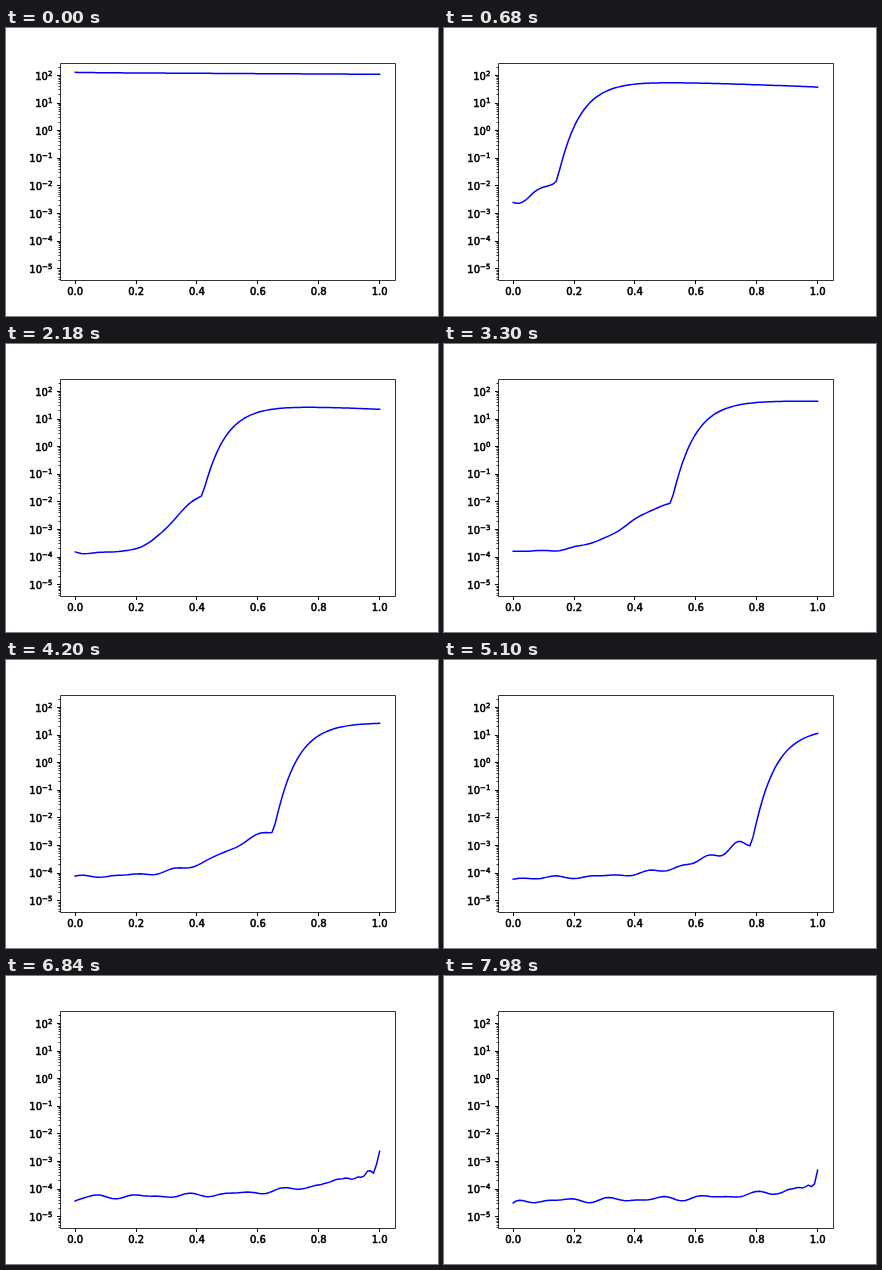
These frames come from a looping animation (432 px wide and 288 px high, 8000 ms). An HTML page:

```html
<!DOCTYPE html>
<html lang="en">
<head>
<meta charset="utf-8">
<title>Log curve</title>
<style>
  html, body { margin: 0; width: 100%; height: 100%; overflow: hidden; background: #fff; }
  svg { display: block; width: 432px; height: 288px; }
  text { font: 10px "DejaVu Sans", sans-serif; stroke: #000; stroke-width: .55px; }
  .sup { font-size: 7px; }
</style>
</head>
<body>
<svg viewBox="0 0 432 288">
  <g id="axes" fill="none" stroke="#000"></g>
  <g id="labels"></g>
  <path id="curve" fill="none" stroke="#00f" stroke-width="1.5" stroke-linejoin="round" stroke-linecap="square"/>
</svg>
<script>
const LOOP = 8000, STEP = 20, COUNT = 100;
const LEFT = 69.2, WIDTH = 304.4, Y100 = 47.4, DECADE = 27.62;

// A front sweeps right: behind it lies a low trail, ahead a rise to a plateau.
// base, kink and top are powers of ten; mid is where the trail is half way up.
const poses = [
  { t: 0,    front: 0,    base: 2.11,  kink: 2.11,  top: 2.1,  mid: .4 },
  { t: 300,  front: .05,  base: -1.7,  kink: -1.35, top: 1.88, mid: .4 },
  { t: 820,  front: .17,  base: -3.05, kink: -2.1,  top: 1.78, mid: .42 },
  { t: 1360, front: .292, base: -3.42, kink: -1.91, top: 1.66, mid: .46 },
  { t: 2180, front: .413, base: -3.86, kink: -1.79, top: 1.51, mid: .725 },
  { t: 3300, front: .515, base: -3.8,  kink: -2.02, top: 1.68, mid: .67 },
  { t: 5100, front: .778, base: -4.17, kink: -2.87, top: 1.26, mid: .77 },
  { t: 5740, front: .855, base: -4.22, kink: -3.1,  top: 1.2,  mid: .78 },
  { t: 6840, front: .98,  base: -4.28, kink: -3.38, top: .8,   mid: .8 },
  { t: 7980, front: .985, base: -4.42, kink: -3.9,  top: .8,   mid: .8 }
];

const lerp = (a, b, p) => a + (b - a) * p;
const toX = x => LEFT + x * WIDTH;
const toY = v => Y100 + (2 - v) * DECADE;

function poseAt(t) {
  let k = 0;
  while (k < poses.length - 2 && t >= poses[k + 1].t) k++;
  const a = poses[k], b = poses[k + 1];
  const p = Math.min(1, (t - a.t) / (b.t - a.t));
  const pose = {};
  for (const key in a) pose[key] = lerp(a[key], b[key], p);
  if (t > 1360) pose.base -= .3 * p * (1 - p) * (1 + Math.sin(t / 60));
  return pose;
}

// Returns the curve at time t as a function of x in 0..1.
function curveAt(t) {
  const { front, base, kink, top, mid } = poseAt(t);
  const sec = t / 1000, span = kink - base;
  const bend = mid / (1 - mid), power = 2.4 - .15 * sec;
  const edge = Math.min(1, sec) * (.15 - .04 * sec);
  const wave = .03 + .28 * (1 - front);
  const ripple = .12 * span * Math.min(1, sec / 5.1) ** 3;
  const droop = .4 * Math.sin(Math.PI * Math.min(1, sec / 3.3));

  function trail(x) {
    const u = x / Math.max(front, .001), back = front - x;
    const climb = 1 / (1 + (bend * (1 - u) / u) ** power);
    const noise = Math.sin(40 * x + t / 580) + .6 * Math.sin(63 * x - t / 700);
    return base + span * (.85 * climb + .15 * u ** 8)
      + edge * Math.exp(-x / .02) + .0075 * sec * noise
      - ripple * Math.exp(-back / (1.3 * wave)) * Math.cos(2 * Math.PI * back / wave);
  }

  const foot = trail(Math.max(front, .001));
  return x => {
    if (x < front) return trail(x);
    const d = x - front;
    const rise = 1 - Math.exp(-14.5 * d * d / (d + .008));
    return lerp(foot, top, rise) - .06 * d - droop * d * d;
  };
}

function curvePath(t) {
  const curve = curveAt(t);
  const points = Array.from({ length: COUNT }, (_, i) => {
    const x = i / (COUNT - 1);
    return toX(x).toFixed(2) + " " + toY(curve(x)).toFixed(2);
  });
  return "M" + points.join("L");
}

function drawAxes() {
  const snap = v => Math.floor(v) + .5;
  let major = "", minor = "", labels = "";

  for (let i = 0; i <= 5; i++) {
    const x = toX(i / 5);
    major += `M${snap(x)} 252.5v3.5`;
    labels += `<text x="${x}" y="267" text-anchor="middle">${(i / 5).toFixed(1)}</text>`;
  }
  for (let e = -6; e <= 2; e++) {
    const y = toY(e);
    if (e >= -5) {
      major += `M54.5 ${snap(y)}h-3.5`;
      const sup = e < 0 ? "\u2212" + -e : e;
      labels += `<text x="46.4" y="${Math.round(y + 4.2)}" text-anchor="end">10`
        + `<tspan class="sup" dy="-3.8">${sup}</tspan></text>`;
    }
    for (let n = 2; n < 10; n++) {
      const ym = toY(e + Math.log10(n));
      if (ym > 35 && ym < 252.5) minor += `M54.5 ${snap(ym)}h-2`;
    }
  }
  document.getElementById("axes").innerHTML =
    `<path d="M54.5 35.5H389.5V252.5H54.5Z" stroke-width=".8"/>`
    + `<path d="${major}"/><path d="${minor}" stroke-width=".8"/>`;
  document.getElementById("labels").innerHTML = labels;
}

const line = document.getElementById("curve");
const start = performance.now();

function render(now) {
  const t = Math.max(0, now - start) % LOOP;
  line.setAttribute("d", curvePath(Math.floor(t / STEP) * STEP));
  requestAnimationFrame(render);
}

drawAxes();
render(start);
</script>
</body>
</html>
```
